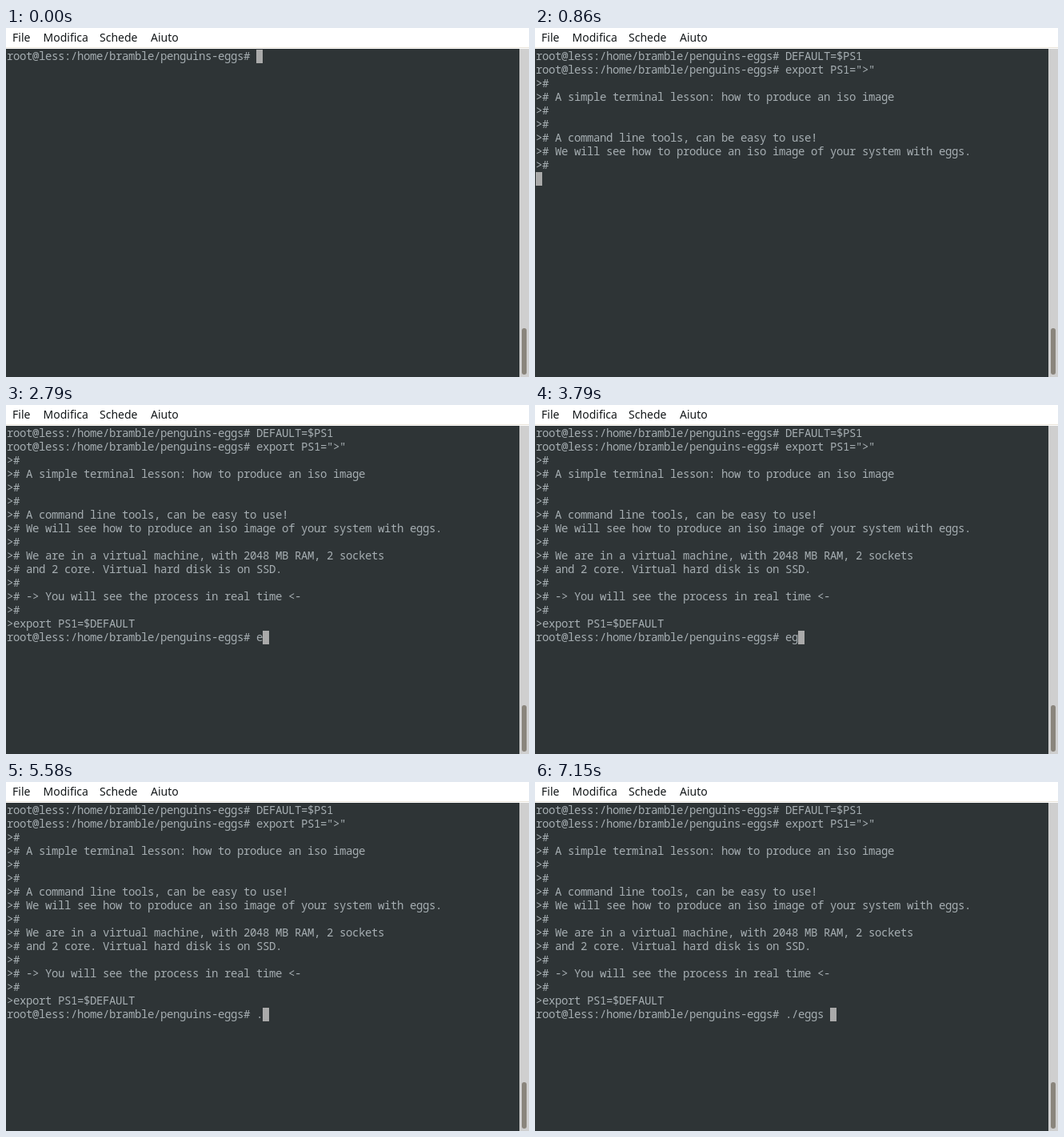
Write an HTML page that moves like this. It is 654x436 px and loops after 8 s.

```html
<!DOCTYPE html>
<html lang="it">
<head>
<meta charset="utf-8">
<title>Terminal lesson</title>
<style>
html, body { margin: 0; height: 100%; overflow: hidden; background: #2e3436; }
svg { display: block; }
.menu { font: 14px "Noto Sans", "Open Sans", sans-serif; fill: #14181a; }
.term { font: 14px "Noto Sans Mono", "DejaVu Sans Mono", monospace; letter-spacing: -0.4px; fill: #a6aeb2; }
.term text { white-space: pre; }
</style>
</head>
<body>
<svg width="654" height="436" viewBox="0 0 654 436">
  <rect width="654" height="436" fill="#2e3436"/>
  <rect width="654" height="26" fill="#fff"/>
  <rect y="24" width="654" height="1" fill="#e9e4da"/>
  <rect x="642" y="26" width="12" height="410" fill="#cfcfcf"/>
  <rect x="645" y="375" width="6" height="58" rx="3" fill="#8a857c"/>
  <g class="menu">
    <text x="8" y="17">File</text>
    <text x="46.5" y="17">Modifica</text>
    <text x="117" y="17">Schede</text>
    <text x="181" y="17">Aiuto</text>
  </g>
  <g class="term" id="term"></g>
  <rect id="cursor" width="8" height="17" fill="#aaa"/>
</svg>
<script>
const LOOP = 8000, CELL = 8, ROW = 17, LEFT = 1, TOP = 27;
const prompt = "root@less:/home/bramble/penguins-eggs# ";
const session = [
  prompt + "DEFAULT=$PS1",
  prompt + 'export PS1=">"',
  ">#",
  "># A simple terminal lesson: how to produce an iso image",
  ">#",
  ">#",
  "># A command line tools, can be easy to use!",
  "># We will see how to produce an iso image of your system with eggs.",
  ">#",
  "># We are in a virtual machine, with 2048 MB RAM, 2 sockets",
  "># and 2 core. Virtual hard disk is on SSD.",
  ">#",
  "># -> You will see the process in real time <-",
  ">#",
  ">export PS1=$DEFAULT"
];

// [start ms, finished lines, text on the cursor line]
const steps = [
  [0, 0, prompt],
  [760, 5, ""],
  [860, 9, ""],
  ...[
    [960, ""], [2790, "e"], [3290, "eg"], [3490, "egg"],
    [3790, "eg"], [3980, "e"], [4180, ""],
    [5580, "."], [6340, "./"], [6830, "./e"], [7150, "./eggs "]
  ].map(([at, typed]) => [at, session.length, prompt + typed])
];

const term = document.getElementById("term");
const cursor = document.getElementById("cursor");
const rows = Array.from({ length: session.length + 1 }, (_, i) => {
  const row = document.createElementNS("http://www.w3.org/2000/svg", "text");
  row.setAttribute("x", LEFT);
  row.setAttribute("y", TOP + 13 + i * ROW);
  return term.appendChild(row);
});

let shown;
function draw(now) {
  const t = now % LOOP;
  const step = steps.findLast(s => s[0] <= t);
  if (step !== shown) {
    shown = step;
    const [, done, line] = step;
    rows.forEach((row, i) => {
      row.textContent = i < done ? session[i] : i === done ? line : "";
    });
    cursor.setAttribute("x", LEFT + line.length * CELL);
    cursor.setAttribute("y", TOP + done * ROW);
  }
  requestAnimationFrame(draw);
}
draw(0);
</script>
</body>
</html>
```
